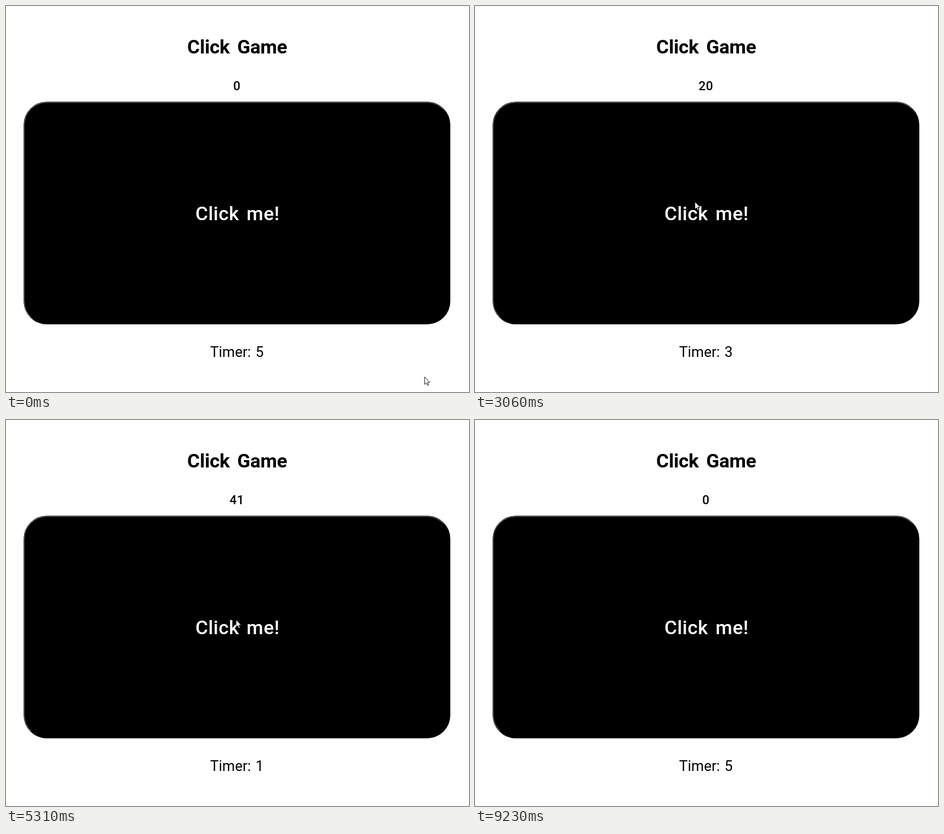
An HTML page for the animation above (9.7 s loop, 820 by 683 pixels).

```html
<!DOCTYPE html>
<html lang="en">
<head>
<meta charset="utf-8">
<title>Click Game</title>
<style>
html, body { margin: 0; width: 100%; height: 100%; overflow: hidden; background: #fff; }
svg { display: block; width: 820px; height: 683px; }
text { font-family: Roboto, "Open Sans", sans-serif; text-anchor: middle; }
.label { font-weight: 500; fill: #fff; }
.button { --face: #000; --lit: #4c4c4c; --shade: #000; }
.button.down { --face: #333; --lit: #000; --shade: #4c4c4c; }
.face { fill: var(--face); stroke: var(--shade); stroke-width: 2; }
.edge { fill: none; stroke: var(--lit); stroke-width: 2; }
</style>
</head>
<body>
<svg viewBox="0 0 820 683">
  <defs>
    <!-- upper left half of each bevel -->
    <clipPath id="padLit"><path d="M31 169H788L747 210L72 523L31 564Z"/></clipPath>
    <clipPath id="againLit"><path d="M333 645H485L460 670H358L333 695Z"/></clipPath>
  </defs>
  <g id="page">
    <text x="409.5" y="84" font-size="34" font-weight="700" letter-spacing="-.2" word-spacing="5">Click Game</text>
    <text id="score" x="409" y="149" font-size="22" font-weight="500" letter-spacing=".5">0</text>
    <g id="pad" class="button">
      <rect class="face" x="32.3" y="170.4" width="753.6" height="391.8" rx="40"/>
      <rect class="edge" x="32.3" y="170.4" width="753.6" height="391.8" rx="40" clip-path="url(#padLit)"/>
      <text class="label" x="410" y="378.5" font-size="34" letter-spacing=".5" word-spacing="4">Click me!</text>
    </g>
    <text id="timer" x="409" y="620.5" font-size="25.5" word-spacing="2">Timer: 5</text>
    <g id="again" class="button">
      <rect class="face" x="335" y="647" width="148" height="46" rx="20"/>
      <rect class="edge" x="335" y="647" width="148" height="46" rx="20" clip-path="url(#againLit)"/>
      <text class="label" x="409" y="677" font-size="22">Restart</text>
    </g>
  </g>
  <path id="cursor" d="M.5 .5V13.7L3.5 10.9L5.5 15.4L7.6 14.5L5.6 10H9.6Z" fill="#fff" stroke="#000" stroke-width=".9"/>
</svg>
<script>
const LOOP = 9700;
const SECONDS = 5, FIRST_PRESS = 1005, GAME_START = 1055;
const GAME_END = GAME_START + SECONDS * 1000;
const RESTART_PRESS = 8110, RESTART = 8175, CURSOR_GONE = 9230;
const CLICK_ORIGIN = 947.4, CLICKS_PER_MS = 0.0095, PRESS_PHASE = 0.55;

// The cursor rests between its moves
const HOME = { x: 741, y: 656 };
const moves = [
  { from: 60, to: 860, x: 418, y: 364 },
  { from: 1000, to: 1460, x: 400, y: 364 },
  { from: 1460, to: 2320, x: 389, y: 346 },
  { from: 3500, to: 5990, x: 411, y: 354 },
  { from: 6390, to: 6660, x: 457, y: 349 },
  { from: 6990, to: 7850, x: 416, y: 634 },
  { from: 8970, to: 9230, x: 630, y: 690 }
];

const $ = id => document.getElementById(id);
const clamp = (v, lo, hi) => Math.max(lo, Math.min(hi, v));
const smooth = k => k * k * (3 - 2 * k);

function cursorAt(t) {
  let { x, y } = HOME;
  for (const m of moves) {
    const k = smooth(clamp((t - m.from) / (m.to - m.from), 0, 1));
    x += (m.x - x) * k;
    y += (m.y - y) * k;
  }
  return [Math.round(x), Math.round(y)];
}

function setText(id, value) {
  const node = $(id);
  if (node.textContent !== value) node.textContent = value;
}

function show(id, visible) {
  $(id).style.display = visible ? "" : "none";
}

function draw(t) {
  const reset = t >= RESTART;
  const over = t >= GAME_END && !reset;
  const clicks = (Math.min(t, GAME_END) - CLICK_ORIGIN) * CLICKS_PER_MS;
  const count = reset ? 0 : Math.max(0, Math.floor(clicks));
  const elapsed = reset ? 0 : clamp(Math.floor((t - GAME_START) / 1000), 0, SECONDS);
  const pressed = t >= FIRST_PRESS && t < GAME_END && clicks % 1 >= PRESS_PHASE;

  setText("score", String(count));
  setText("timer", "Timer: " + (SECONDS - elapsed));
  $("pad").classList.toggle("down", pressed);
  $("again").classList.toggle("down", t >= RESTART_PRESS);
  $("page").setAttribute("transform", `translate(0 ${over ? -34 : 0})`);
  show("again", over);

  $("cursor").setAttribute("transform", `translate(${cursorAt(t)})`);
  show("cursor", t < CURSOR_GONE);
}

const start = performance.now();
function tick() {
  draw((performance.now() - start) % LOOP);
  requestAnimationFrame(tick);
}
tick();
</script>
</body>
</html>
```
